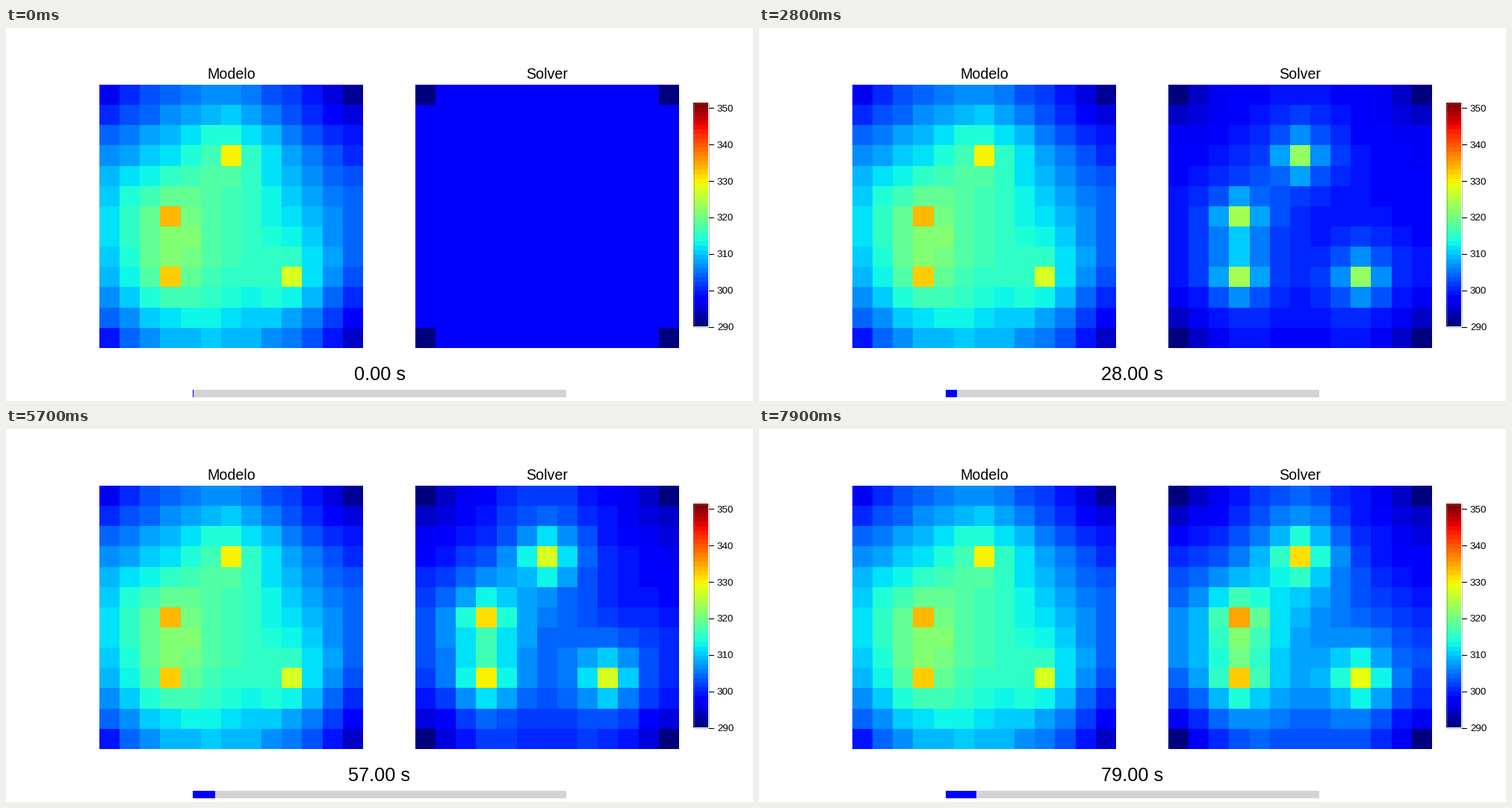
Recreate the animation shown at these times as a matplotlib script. Size 1000 px wide and 500 px high, loop 8 s.

```python
import numpy as np
import matplotlib.pyplot as plt
from matplotlib.animation import FuncAnimation
from matplotlib.patches import Rectangle

W, H, DPI = 1000, 500, 100
FRAMES, INTERVAL = 80, 100
N = 13
T_MIN, T_MAX, LEVELS = 290.0, 351.4, 50
CMAP = plt.get_cmap("jet", LEVELS)

# Heat conduction on a plate with four heaters and fixed cold corners
HEATERS = [(3, 6), (6, 3), (9, 3), (9, 9)]
T_INIT, T_CORNER = 298.0, 290.0
DIFFUSION = 0.072                           # 1/s between neighbouring nodes
HEATING = 4.8                               # K/s at a heater
SUB = 10                                    # time steps per second


def simulate(seconds):
    corners = np.ix_([0, -1], [0, -1])
    source = np.zeros((N, N))
    for node in HEATERS:
        source[node] = HEATING
    temp = np.full((N, N), T_INIT)
    temp[corners] = T_CORNER
    out = [temp.copy()]
    for _ in range(seconds - 1):
        for _ in range(SUB):
            pad = np.pad(temp, 1, mode="edge")
            lap = (pad[:-2, 1:-1] + pad[2:, 1:-1] + pad[1:-1, :-2]
                   + pad[1:-1, 2:] - 4 * temp)
            temp = temp + (DIFFUSION * lap + source) / SUB
            temp[corners] = T_CORNER
        out.append(temp.copy())
    return out


def predicted():
    """Broad warm dome, cooled near the corners, with a halo and peak per heater."""
    r, c = np.mgrid[:N, :N]
    field = 292 + 24 * np.exp(-((r - 7) ** 2 + (c - 4.3) ** 2) / 100)
    to_corner = np.hypot(np.minimum(r, N - 1 - r), np.minimum(c, N - 1 - c))
    field -= 8 * np.exp(-to_corner / 2.5)
    for hr, hc in HEATERS:
        field += 6 * np.exp(-((r - hr) ** 2 + (c - hc) ** 2) / 4)
        field[hr, hc] += 12
    return field


plt.rcParams["font.family"] = "Liberation Sans"
fig = plt.figure(figsize=(W / DPI, H / DPI), dpi=DPI, facecolor="white")
ax = fig.add_axes([0, 0, 1, 1])


def heatmap(data, x0, y0, x1, y1):
    return ax.imshow(data, cmap=CMAP, vmin=T_MIN, vmax=T_MAX, aspect="auto",
                     interpolation="nearest", extent=(x0, x1, y1, y0))


def label(x, y, text, px, **kw):
    return ax.text(x, y, text, fontsize=px * 72 / DPI, color="black",
                   va="baseline", **kw)


def bar(width, color):
    rect = Rectangle((250, 485), width, 10, color=color, lw=0, antialiased=False)
    return ax.add_patch(rect)


states = simulate(FRAMES)
heatmap(predicted(), 125, 76, 478, 429)
plate = heatmap(states[0], 548, 76, 901, 429)
label(301.5, 68, "Modelo", 19.6, ha="center")
label(724, 68, "Solver", 19.6, ha="center")

# Colour scale
heatmap(np.linspace(T_MAX, T_MIN, LEVELS)[:, None], 920, 100, 940, 400)
ax.add_patch(Rectangle((920.5, 100.5), 20, 300, fill=False, ec="gray", lw=0.36))
for t in range(290, 351, 10):
    y = 400.5 - (t - T_MIN) * 300 / (T_MAX - T_MIN)
    ax.plot([941, 947], [y, y], color="black", lw=0.8)
    label(952, y + 4.5, str(t), 13.4)

clock = label(500, 472.5, "", 25.4, ha="center")
bar(500, "lightgray")
progress = bar(1, "blue")

ax.set_xlim(0, W)
ax.set_ylim(H, 0)
ax.axis("off")


def draw(i):
    plate.set_data(states[i])
    clock.set_text(f"{i:.2f} s")
    progress.set_width((i + 1) // 2 + 1)
    return plate, clock, progress


anim = FuncAnimation(fig, draw, frames=FRAMES, interval=INTERVAL,
                     repeat=True, repeat_delay=0)
plt.show()
```
